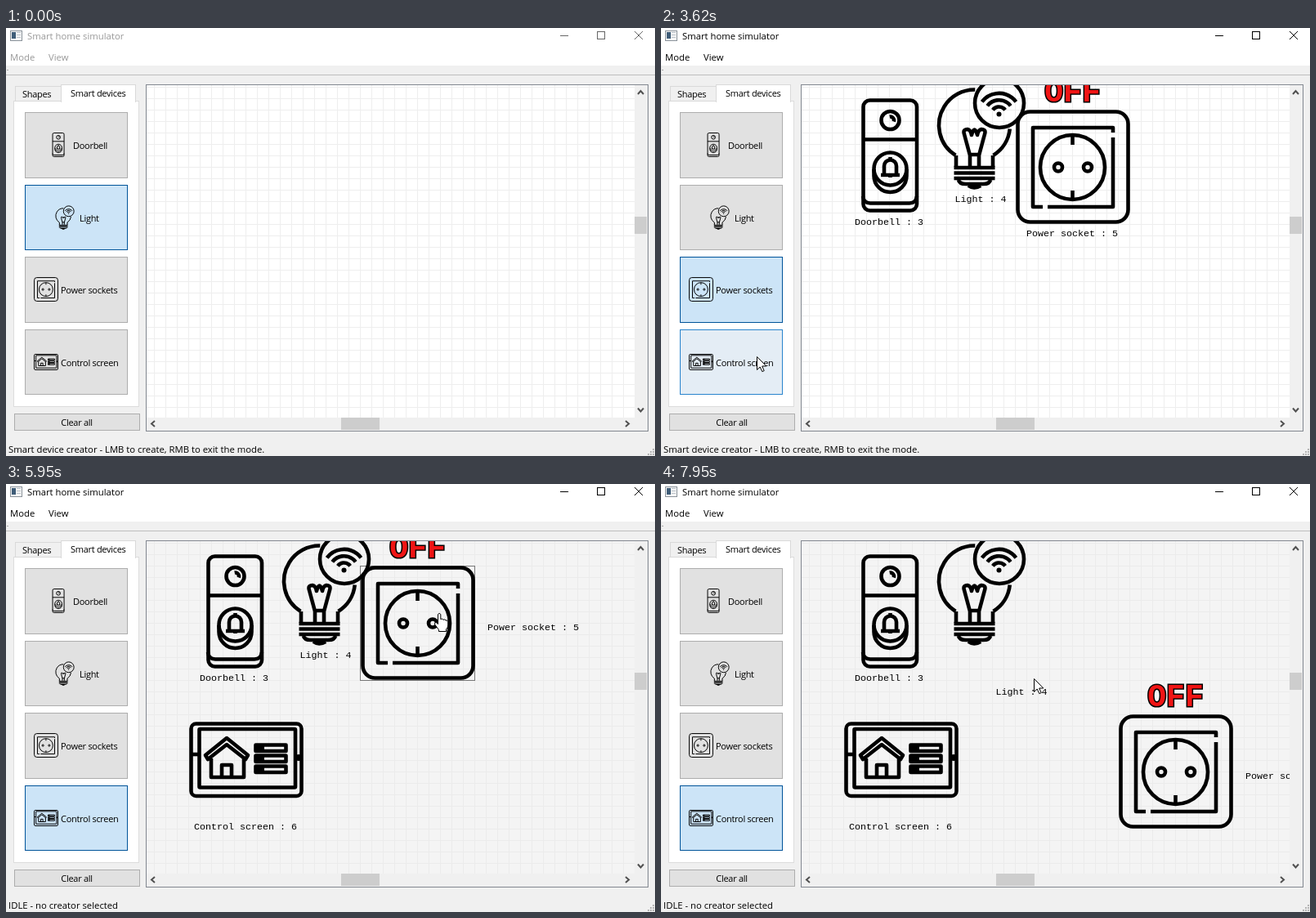
These frames come from a looping animation (794 px wide and 524 px high, 8000 ms). An HTML page with a canvas:

```html
<!DOCTYPE html>
<html lang="en">
<head>
<meta charset="utf-8">
<title>Smart home simulator</title>
<style>
html, body { margin: 0; width: 794px; height: 524px; overflow: hidden; background: #f0f0f0; }
canvas { display: block; }
</style>
</head>
<body>
<canvas id="stage" width="794" height="524"></canvas>
<script>
const ctx = document.getElementById('stage').getContext('2d');
const LOOP = 8000, CELL = 14, SIZE = 10 * CELL, IDLE_AT = 4300;
const UI = '11px "Open Sans", sans-serif';
const SYS = '11.3px "Open Sans", sans-serif';
const MONO = '11.67px "Liberation Mono", monospace';
const BIG = 'bold 38px "Liberation Mono", monospace';

// pick: cursor reaches the palette button; born: item is placed; stay: pause after that
const ITEMS = [
  { icon: 'doorbell', label: 'Doorbell : 3', x: 210, y: 86, aim: 40, pick: 430, born: 920, stay: 570 },
  { icon: 'light', label: 'Light : 4', x: 322, y: 58, aim: 45, pick: 1740, born: 2220, stay: 100 },
  { icon: 'socket', label: 'Power socket : 5', x: 434, y: 100, aim: 58, pick: 2600, born: 3070, stay: 90, state: 'OFF' },
  { icon: 'screen', label: 'Control screen : 6', x: 224, y: 268, aim: 33, pick: 3600, born: 4080, stay: 340 }
];
const [, LIGHT, SOCKET] = ITEMS;

// button goes down, cursor sets off, button comes up
const DRAGS = [
  { item: SOCKET, part: 'label', down: 4800, go: 5130, up: 5640, from: [504, 256], by: [142, -76] },
  { item: SOCKET, part: 'body', down: 6110, go: 6140, up: 6390, from: [488, 150], by: [42, 126] },
  { item: SOCKET, part: 'body', down: 6390, go: 6400, up: 6520, from: [530, 276], by: [28, 14] },
  { item: LIGHT, part: 'label', down: 6740, go: 7070, up: 7370, from: [392, 210], by: [50, 45] },
  { item: SOCKET, part: 'body', down: 7500, go: 7520, up: 7700, from: [558, 300], by: [56, 42] }
];

const BUTTONS = ['Doorbell', 'Light', 'Power sockets', 'Control screen'].map((label, i) => {
  const y = Math.round(103 + 88.6 * i), wide = i > 1;
  return {
    label, y, h: Math.round(183.6 + 88.6 * i) - y, item: ITEMS[i],
    iconX: wide ? 34 : 49 + 8 * i, textX: wide ? 67 : 82 + 8 * i
  };
});

const stop = (arrive, leave, [x, y]) => ({ arrive, leave, x, y });
const STOPS = [
  stop(0, 90, [150, 540]),
  ...BUTTONS.flatMap(({ y, item: it }) => [
    stop(it.pick, it.pick + 150, [117, y + it.aim]),
    stop(it.born - 30, it.born + it.stay, [it.x + SIZE / 2, it.y + SIZE / 2])
  ]),
  ...DRAGS.flatMap(d => [
    stop(d.down, d.go, d.from),
    stop(d.up - 20, d.up, d.from.map((v, i) => v + d.by[i]))
  ]),
  stop(7870, 7905, [513, 188]),
  stop(7948, LOOP, [456, 238])
];
const PRESSES = [
  ...ITEMS.flatMap(it => [[it.pick + 80, it.pick + 140], [it.born, it.born + 60]]),
  ...DRAGS.map(d => [d.down, d.up])
];

const clamp = v => Math.max(0, Math.min(1, v));
const ease = u => u * u * (3 - 2 * u);
const snap = v => Math.round(v / CELL) * CELL;
const latest = (list, key, t) => list.filter(o => o[key] <= t).pop();

function cursorAt(t) {
  const a = latest(STOPS, 'arrive', t);
  const b = STOPS[STOPS.indexOf(a) + 1] || a;
  const u = t <= a.leave ? 0 : ease(clamp((t - a.leave) / (b.arrive - a.leave)));
  return [a.x + (b.x - a.x) * u, a.y + (b.y - a.y) * u].map(Math.round);
}

// total distance a part of an item has been dragged
function moved(item, part, t) {
  const sum = [0, 0];
  for (const d of DRAGS) {
    if (d.item !== item || d.part !== part || t < d.go) continue;
    const at = cursorAt(Math.min(t, d.up));
    for (const i of [0, 1]) {
      const v = at[i] - d.from[i];
      sum[i] += part === 'body' ? snap(v) : v;
    }
  }
  return sum;
}

function mix(a, b, u) {
  return `rgb(${a.map((v, i) => Math.round(v + (b[i] - v) * u))})`;
}
function fill(color, x, y, w, h) {
  ctx.fillStyle = color;
  ctx.fillRect(x, y, w, h);
}
function box(x, y, w, h, bg, border) {
  fill(border, x, y, w, h);
  fill(bg, x + 1, y + 1, w - 2, h - 2);
}
function text(s, x, y, font = UI, color = '#000', align = 'left') {
  ctx.font = font;
  ctx.letterSpacing = font === UI ? '-0.29px' : '0px';
  ctx.textAlign = align;
  ctx.fillStyle = color;
  ctx.fillText(s, x, y);
}
function pen(color, width = 1) {
  ctx.strokeStyle = color;
  ctx.lineWidth = width;
}
function line(...p) {
  ctx.beginPath();
  for (let i = 0; i < p.length; i += 2) ctx.lineTo(p[i], p[i + 1]);
  ctx.stroke();
}
function arc(x, y, r, a = 0, b = 360) {
  ctx.beginPath();
  ctx.arc(x, y, r, a * Math.PI / 180, b * Math.PI / 180);
  ctx.stroke();
}
function dot(x, y, r) {
  ctx.beginPath();
  ctx.arc(x, y, r, 0, Math.PI * 2);
  ctx.fill();
}
function round(x, y, w, h, r) {
  ctx.beginPath();
  ctx.roundRect(x, y, w, h, r);
  ctx.stroke();
}
const path = d => ctx.stroke(new Path2D(d));

// icons live in a 140 x 140 square
const ICONS = {
  doorbell() {
    round(37.5, 2.5, 65.5, 135, 8);
    line(37, 50.5, 103, 50.5);
    path('M37 120 Q38 128.5 46 128.5 H94 Q102 128.5 103 120');
    arc(70.5, 27, 11);
    arc(70.5, 27, 4.5, -100, 20);
    arc(70.5, 86.5, 20);
    path('M50.5 87 V95 A20 20 0 0 0 90.5 95 V87');
    path('M59 94 H82 M63 93 V83 A7.5 7.5 0 0 1 78 83 V93 M70.5 72 V76 M70.5 95 V97');
  },
  light() {
    arc(61.5, 61, 43.5, 6, 58);
    arc(61.5, 61, 43.5, 122, 271);
    arc(92, 34, 30);
    path('M39 98 V112 M84 98 V112');
    for (let y = 113; y < 128; y += 6.5) line(36.5, y, 86.5, y);
    path('M42 128 Q43 133 51 133 H72 Q80 133 81 128 M54 135 Q61 140 69 135');
    path('M56 98 L49 72 Q47 66 53 66 Q57 67 58 73 Q61.5 60 65 73 Q66 67 70 66 Q76 66 74 72 L67 98 M56 111 V97 H67 V111');
    for (let r = 9.5; r < 28; r += 8.3) arc(91.5, 48, r, -143, -37);
    dot(91.5, 47.5, 3);
  },
  socket() {
    round(2.5, 2.5, 135, 135, 15);
    path('M33 119 H21 V22 H119 V28 M119 34 V119 H39');
    arc(69.5, 70.5, 39.5);
    arc(52, 70.5, 5);
    arc(88, 70.5, 5);
    path('M69.5 31 V43 M69.5 99 V110');
  },
  screen() {
    round(2.5, 25.5, 135, 88.5, 6);
    round(12.5, 32, 117.5, 71.5, 1);
    line(3, 63, 12, 63);
    dot(134, 67, 4);
    path('M46 43 L72 64 L69 69 L46 51 L23 69 L20 64 Z M27 68 V91 H67 V68 M40 91 V76 H52 V91');
    for (let y = 51.5; y < 80; y += 13) {
      ctx.strokeRect(81.5, y, 37, 7.5);
      line(82, y + 3.7, 92, y + 3.7);
    }
  }
};

function icon(name, x, y, size, color = '#000') {
  ctx.save();
  ctx.translate(x, y);
  ctx.scale(size / SIZE, size / SIZE);
  pen(color, 4.6);
  ctx.fillStyle = color;
  ctx.lineJoin = 'round';
  ICONS[name]();
  ctx.restore();
}

function drawButton(b, t) {
  const { pick, icon: name } = b.item;
  const picked = ITEMS.filter(it => it.pick + 90 <= t).pop() || LIGHT;
  const hover = Math.min(clamp((t - pick + 110) / 170), clamp((pick + 420 - t) / 170));
  const on = picked === b.item;
  const bg = on ? '#cce4f7' : mix([225, 225, 225], [229, 241, 251], hover);
  const border = on ? '#005499' : mix([173, 173, 173], [0, 120, 215], hover);
  box(23, b.y, 126, b.h, bg, border);
  icon(name, b.iconX, b.y + 25, 30);
  text(b.label, b.textX, b.y + 45);
}

function chevron(x, y, dx, dy) {
  pen('#505050', 2);
  line(x - dx * 2 - dy * 3.5, y - dy * 2 - dx * 3.5, x + dx * 2, y + dy * 2,
       x - dx * 2 + dy * 3.5, y - dy * 2 + dx * 3.5);
}

function drawWindow(t) {
  const active = t >= 90, ink = active ? '#000' : '#999';
  fill('#f0f0f0', 0, 0, 794, 524);
  fill('#fff', 0, 0, 794, 46);
  fill('#bdbdbd', 0, 57, 794, 1);
  fill('#a8a8a8', 1, 51, 2, 1);

  box(5, 3, 15, 13, '#f6f6f6', '#8a929a');
  fill('#3f5d78', 7, 5, 5, 8);
  for (let y = 5; y < 12; y += 3) fill('#b9c1c8', 13, y, 5, 1);
  text('Smart home simulator', 26, 14, SYS, ink);
  text('Mode', 5, 40, SYS, ink);
  text('View', 52, 40, SYS, ink);

  pen(active ? '#000' : '#666');
  line(678, 9.5, 688, 9.5);
  ctx.strokeRect(723.5, 4.5, 9, 9);
  line(769, 4, 779, 14);
  line(779, 4, 769, 14);

  box(9, 89, 154, 375, '#fff', '#dcdcdc');
  box(11, 71, 57, 19, '#f0f0f0', '#d9d9d9');
  box(67, 69, 92, 22, '#fff', '#d9d9d9');
  fill('#fff', 68, 89, 90, 3);
  text('Shapes', 20, 85);
  text('Smart devices', 79, 84);
  BUTTONS.forEach(b => drawButton(b, t));
  box(10, 472, 154, 21, '#e1e1e1', '#adadad');
  text('Clear all', 86.5, 487, UI, '#000', 'center');

  text(t < IDLE_AT ? 'Smart device creator - LMB to create, RMB to exit the mode.'
                   : 'IDLE - no creator selected', 3, 520, SYS);
  for (let r = 0; r < 3; r++)
    for (let c = 0; c <= r; c++) fill('#b4b4b4', 791 - c * 3, 515 + r * 3, 2, 2);
}

function drawView(t) {
  const idle = t >= IDLE_AT, grid = idle ? '#ebebeb' : '#eee';
  box(171, 69, 615, 425, '#f0f0f0', '#828790');
  fill(idle ? '#f4f4f4' : '#fff', 172, 70, 597, 407);
  for (let x = 181; x < 769; x += CELL) fill(grid, x, 70, 1, 407);
  for (let y = 72; y < 477; y += CELL) fill(grid, 172, y, 597, 1);
  fill('#cdcdcd', 769, 231, 15, 21);
  fill('#cdcdcd', 410, 477, 47, 15);
  chevron(776.5, 79, 0, -1);
  chevron(776.5, 467.5, 0, 1);
  chevron(180, 484.5, -1, 0);
  chevron(760, 484.5, 1, 0);
}

// where an item is now, and how it is marked
function pose(item, t) {
  const [dx, dy] = moved(item, 'body', t);
  const last = latest(DRAGS, 'down', t);
  const byLabel = last && last.part === 'label';
  const framed = last && last.item === item && t < last.up + (byLabel ? 480 : 0);
  return {
    ...item, x: item.x + dx, y: item.y + dy, off: moved(item, 'label', t),
    framed, tinted: framed && !byLabel
  };
}

function drawItem(it) {
  const cx = it.x + SIZE / 2;
  icon(it.icon, it.x, it.y, SIZE, it.tinted ? '#c6d5ee' : '#000');
  if (it.framed) {
    pen('#000');
    ctx.setLineDash([1, 1]);
    ctx.strokeRect(it.x - 0.5, it.y + 0.5, SIZE, SIZE);
    ctx.setLineDash([]);
  }
  text(it.label, cx - it.label.length * 3.5 - 1 + it.off[0], it.y + 155 + it.off[1], MONO);
  if (it.state) {
    ctx.font = BIG;
    ctx.letterSpacing = '0px';
    ctx.textAlign = 'center';
    ctx.lineJoin = 'miter';
    pen('#000', 3);
    ctx.strokeText(it.state, cx - 0.5, it.y - 10);
    text(it.state, cx - 0.5, it.y - 10, BIG, '#f01414', 'center');
  }
}

const ARROW = new Path2D('M.5 .5 V16.5 L4.2 13 L6.8 18.6 L9.2 17.6 L6.7 12 H11.8 Z');
const HAND = new Path2D('M-1.5 1.5 Q0 -.8 1.8 1.5 V7.5 Q4 6.3 5 8.3 Q7 7 8 9 Q10.5 8.2 10.7 10.8 V15 Q10.5 18 8.5 20 V22.5 H-.5 V20.5 L-5.5 13.8 Q-6 11.5 -3.8 11.5 L-1.5 13.5 Z');

function drawCursor(t, items) {
  const [x, y] = cursorAt(t);
  if (PRESSES.some(([a, b]) => t >= a && t < b)) {
    ctx.fillStyle = 'rgba(250, 242, 20, 0.55)';
    dot(x - 0.5, y - 0.5, 12);
  }
  const over = items.some(it => t >= it.born + 420 &&
    x > it.x && x < it.x + SIZE && y > it.y && y < it.y + SIZE);
  const shape = over ? HAND : ARROW;
  ctx.save();
  ctx.translate(x, y);
  ctx.fillStyle = '#fff';
  pen('#000');
  ctx.fill(shape);
  ctx.stroke(shape);
  ctx.restore();
}

function draw(t) {
  const items = ITEMS.filter(it => t >= it.born).map(it => pose(it, t));
  drawWindow(t);
  drawView(t);
  ctx.save();
  ctx.beginPath();
  ctx.rect(172, 70, 597, 407);
  ctx.clip();
  items.forEach(drawItem);
  ctx.restore();
  drawCursor(t, items);
}

let start;
function tick(now) {
  if (start === undefined) start = now;
  draw((now - start) % LOOP);
  requestAnimationFrame(tick);
}
draw(0);
requestAnimationFrame(tick);
</script>
</body>
</html>
```
